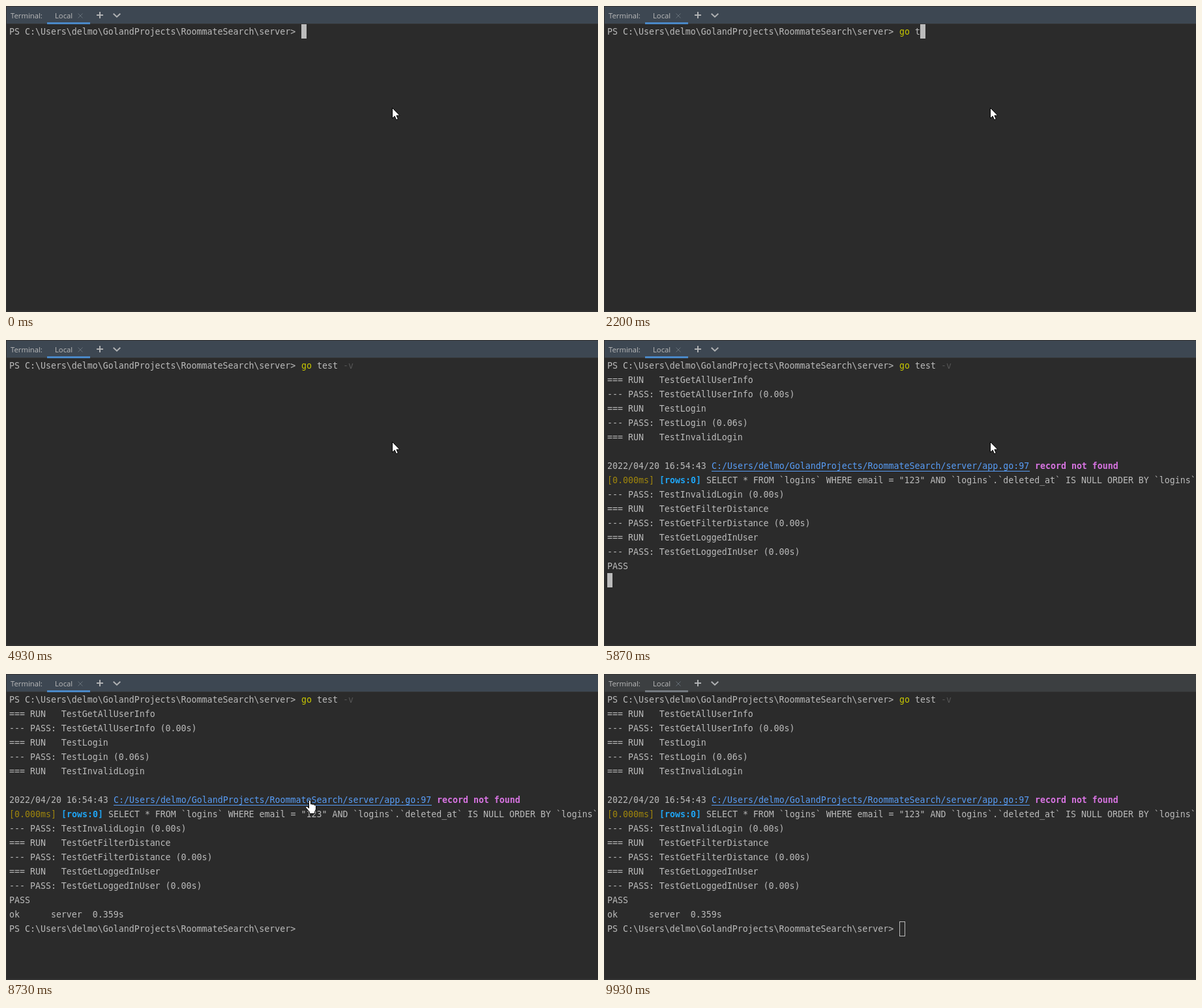
Recreate the animation shown at these times as an HTML page. Size 908x470 px, loop 9990 ms.

```html
<!DOCTYPE html>
<html lang="en">
<head>
<meta charset="utf-8">
<title>Terminal test run</title>
<style>
html, body { margin: 0; width: 100%; height: 100%; overflow: hidden; background: #2b2b2b; }
svg { display: block; width: 908px; height: 470px; }
text { white-space: pre; }
.mono { font: 13.288px "DejaVu Sans Mono", "Noto Sans Mono", monospace; }
.ui { font: 11.3px "Open Sans", "Noto Sans", sans-serif; fill: #bbbbbb; }
</style>
</head>
<body>
<svg id="stage" viewBox="0 0 908 470">
  <rect width="908" height="470" fill="#323232"/>
  <rect x="1" y="28" width="907" height="440" fill="#2b2b2b"/>
  <rect id="header" x="1" y="1" width="907" height="26"/>
  <rect id="tabLine" x="63" y="25" width="66" height="3"/>
  <text class="ui" x="7" y="19">Terminal:</text>
  <text class="ui" x="75" y="19">Local</text>
  <path d="M110.5 11.5l7 7m0-7l-7 7" stroke="#667078" fill="none"/>
  <path d="M139 14h10m-5-5v10" stroke="#afb1b3" stroke-width="2" fill="none"/>
  <path d="M164.7 11.7l5.3 5 5.3-5" stroke="#afb1b3" stroke-width="2" fill="none"/>
  <g id="screen" class="mono"></g>
  <rect id="caret"/>
  <g id="pointer" fill="#fff" stroke="#000" stroke-linejoin="round">
    <path id="arrow" d="M.5 .5V16.6L4.2 13.2 6.6 18.8 9.3 17.6 6.9 12.2H11.9Z"/>
    <path id="hand" transform="translate(-6 0)" d="M5.5 2Q7 -.5 8.5 2V7Q10.2 5.8 11.2 7.4Q12.8 6.4 13.8 8.2Q16 7.4 16.5 9.8V14Q16.5 16 14.5 18.5V21.5H6.5V19L1 12.6Q0 11 1.5 10.4Q3 10 5.5 13Z"/>
  </g>
</svg>
<script>
const LOOP = 9990, COL = 8, ROW = 22, LEFT = 5, TOP = 28, TICK = 200 / 3;
const FG = '#bbbbbb', YELLOW = '#c8c800', DIM = '#555555';
const PROMPT = 'PS C:\\Users\\delmo\\GolandProjects\\RoommateSearch\\server> ';
const LINK = 'C:/Users/delmo/GolandProjects/RoommateSearch/server/app.go:97';
const COMMAND = [['go', YELLOW], [' test', FG], [' -v', DIM]];
const KEY_TIMES = [1870, 1930, 2070, 2200, 2330, 2470, 2530, 2730, 3270, 3400];
const ENTER = 3930, BLUR = 9930;

const run = name => [['=== RUN   ' + name, FG]];
const pass = (name, time = '0.00') => [[`--- PASS: ${name} (${time}s)`, FG]];

const OUTPUT = [
  run('TestGetAllUserInfo'),
  pass('TestGetAllUserInfo'),
  run('TestLogin'),
  pass('TestLogin', '0.06'),
  run('TestInvalidLogin'),
  [],
  [['2022/04/20 16:54:43 ', FG], [LINK, '#589df6', 'link'], [' record not found', '#d874e2', 'bold']],
  [['[0.000ms] ', '#a0870c'], ['[rows:0]', '#1fa5f5', 'bold'],
   [' SELECT * FROM `logins` WHERE email = "123" AND `logins`.`deleted_at` IS NULL ORDER BY `logins`', FG]],
  pass('TestInvalidLogin'),
  run('TestGetFilterDistance'),
  pass('TestGetFilterDistance'),
  run('TestGetLoggedInUser'),
  pass('TestGetLoggedInUser'),
  [['PASS', FG]],
  [['ok      server  0.359s', FG]],
  [[PROMPT, FG]]
];

const $ = id => document.getElementById(id);
const set = (el, attrs) => { for (const k in attrs) el.setAttribute(k, attrs[k]); };
const show = (el, on) => set(el, { visibility: on ? 'visible' : 'hidden' });

function add(parent, tag, attrs) {
  const el = document.createElementNS('http://www.w3.org/2000/svg', tag);
  set(el, attrs);
  parent.appendChild(el);
  return el;
}

// Draws one row of coloured runs and returns its group.
function addRow(row, runs, col = 0) {
  const group = add($('screen'), 'g', {});
  for (const [str, fill, style] of runs) {
    const x = LEFT + col * COL, y = TOP + row * ROW + 16;
    const el = add(group, 'text', { x, y, fill });
    el.textContent = str;
    if (style === 'bold') el.style.fontWeight = 700;
    if (style === 'link') add(group, 'rect', { x, y: y + 3, width: str.length * COL, height: 1, fill });
    col += str.length;
  }
  return group;
}

addRow(0, [[PROMPT, FG]]);
const typed = [...addRow(0, COMMAND, PROMPT.length).children];
const rows = OUTPUT.map((runs, i) => addRow(i + 1, runs));

// Moments at which the caret disappears and returns.
const BLINKS = [[600, 1130], [1600, 1870], [4930, 5400], [6470, 6930],
                [7470, 7930], [8470, 8930], [9470, BLUR]];

function drawCaret(t, keys, lines) {
  let row = 0, col = PROMPT.length + keys;
  if (t >= ENTER) {
    row = lines === OUTPUT.length ? lines : lines + 1;
    col = lines === OUTPUT.length ? PROMPT.length : 0;
  }
  const x = LEFT + col * COL, y = TOP + row * ROW;
  if (t >= BLUR) {
    set($('caret'), { x: x + .5, y: y + .5, width: COL, height: ROW, fill: 'none', stroke: '#bbbbbb' });
  } else {
    set($('caret'), { x, y, width: COL, height: ROW, fill: '#bbbbbb', stroke: 'none' });
  }
  show($('caret'), !BLINKS.some(([off, on]) => t >= off && t < on));
}

// The pointer speeds up toward the lower left and leaves the stage.
function drawPointer(t) {
  const step = Math.floor((t + 5) / TICK) - 127;
  const p = Math.max(0, step / 10);
  const x = Math.round(592 - 515 * p ** 1.53);
  const y = Math.round(156 + 299 * p ** 2.28);
  const overLink = y >= 182 && y < 204;
  set($('pointer'), { transform: `translate(${x} ${y})` });
  show($('arrow'), step < 11 && !overLink);
  show($('hand'), step < 11 && overLink);
}

function draw(t) {
  const active = t < BLUR;
  set($('header'), { fill: active ? '#3d4752' : '#3c3f41' });
  set($('tabLine'), { fill: active ? '#4a88c7' : '#747a80' });

  const keys = KEY_TIMES.filter(k => t >= k).length;
  let start = 0;
  COMMAND.forEach(([str], i) => {
    typed[i].textContent = str.slice(0, Math.max(0, keys - start));
    start += str.length;
  });

  const lines = t < 5800 ? 0 : t < 5870 ? 3 : t < 5930 ? 14 : OUTPUT.length;
  rows.forEach((row, i) => show(row, i < lines));
  drawCaret(t, keys, lines);
  drawPointer(t);
}

const began = performance.now();
function frame() {
  draw((performance.now() - began) % LOOP);
  requestAnimationFrame(frame);
}
draw(0);
requestAnimationFrame(frame);
</script>
</body>
</html>
```
